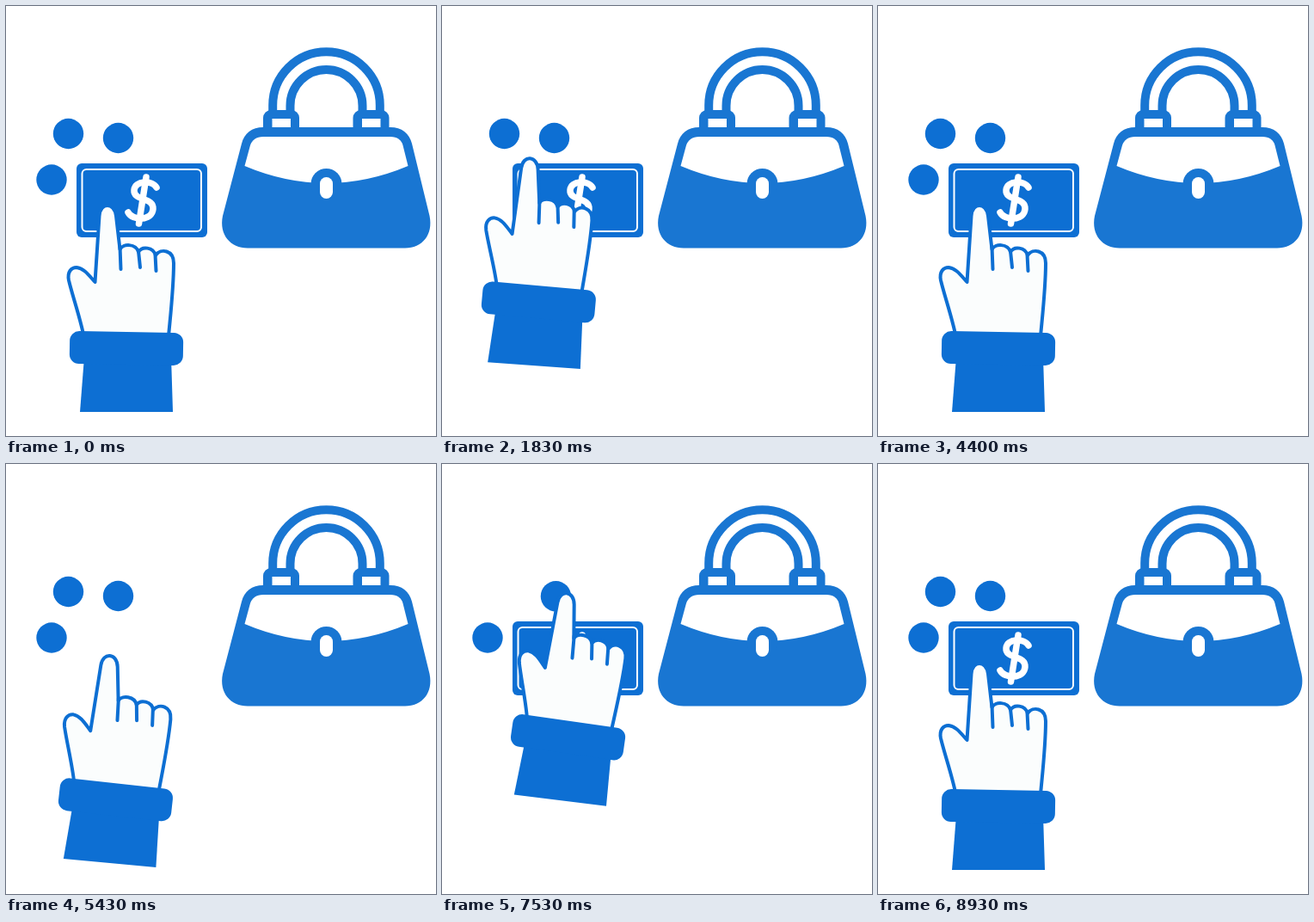
Animation of 500 by 500 pixels, one loop 9.01 s. Source, as an HTML page with a canvas:

```html
<!DOCTYPE html>
<html lang="en">
<head>
<meta charset="utf-8">
<title>Swipe to the bag</title>
<style>
  html, body { margin: 0; width: 100%; height: 100%; overflow: hidden; background: #fff; }
  canvas { display: block; width: 100vmin; height: 100vmin; }
</style>
</head>
<body>
<canvas id="stage" width="500" height="500"></canvas>
<script>
const ctx = document.getElementById('stage').getContext('2d');
const BLUE = '#0d6fd3', BAG = '#1976d2', SKIN = '#fbfdfd';
const LOOP = 9010, CYCLE = 4500;
const TIP = { x: 118, y: 230 };

// Hand poses: time, fingertip x, fingertip y, tilt in degrees
const POSES = [
  [20, 118, 230, 0],
  [430, 152, 234, 6.7],
  [677, 152, 234, 6.7],
  [1278, 70, 199.5, 3],
  [1625, 115, 199.5, 3.5],
  [2068, 87, 144.5, 5],
  [2430, 130, 151, 6],
  [3000, 144.5, 148.2, 7.1],
  [3301, 185, 152, 7.1],
  [4166, 118, 230, 0]
];

// Each item slides by dx, dy behind the bag, then fades back in at home
const DOTS = [
  { x: 53, y: 202, dx: 250, dy: 6, start: 1278 },
  { x: 72.5, y: 148.5, dx: 235, dy: 38, start: 2090 },
  { x: 130.5, y: 153.5, dx: 175, dy: 28, start: 3000 }
];
const BILL = { dx: 187, dy: 0, start: 190 };
const SLIDE = 450, AWAY = 1130, FADE = 150;

const clamp = v => Math.max(0, Math.min(1, v));
const ease = u => (1 - Math.cos(Math.PI * clamp(u))) / 2;

function handPose(t) {
  let i = POSES.findIndex(p => p[0] > t);
  if (i < 0) i = POSES.length;
  const a = POSES[Math.max(0, i - 1)], b = POSES[Math.min(i, POSES.length - 1)];
  const f = a === b ? 0 : ease((t - a[0]) / (b[0] - a[0]));
  return [1, 2, 3].map(k => a[k] + (b[k] - a[k]) * f);
}

function withItem(item, t, draw) {
  const age = t - item.start;
  const back = age >= AWAY;
  const f = back ? 0 : ease(age / SLIDE);
  if (f === 1) return;
  ctx.save();
  if (back) ctx.globalAlpha = clamp((age - AWAY) / FADE);
  ctx.translate(item.dx * f, item.dy * f);
  draw();
  ctx.restore();
}

function box(x, y, w, h, r) {
  ctx.beginPath();
  ctx.roundRect(x, y, w, h, r);
}

function fillPath(d, color) {
  ctx.fillStyle = color;
  ctx.fill(new Path2D(d));
}

function strokePath(d, color, width) {
  ctx.strokeStyle = color;
  ctx.lineWidth = width;
  ctx.lineCap = ctx.lineJoin = 'round';
  ctx.stroke(new Path2D(d));
}

function drawBill() {
  ctx.fillStyle = BLUE;
  box(82, 183, 152, 86, 6);
  ctx.fill();
  ctx.strokeStyle = '#fff';
  ctx.lineWidth = 2;
  box(88.5, 190, 138.5, 72, 5);
  ctx.stroke();
  strokePath('M175 211C170 202 150 203 149 214C148 227 172 222 171 236C170 250 147 250 142 240', '#fff', 7.5);
  strokePath('M163 199L154.5 253', '#fff', 7.5);
}

function drawDot(dot) {
  ctx.fillStyle = BLUE;
  ctx.beginPath();
  ctx.arc(dot.x, dot.y, 17.7, 0, 7);
  ctx.fill();
}

function drawHand([x, y, tilt]) {
  ctx.save();
  ctx.translate(x, y);
  ctx.rotate(tilt * Math.PI / 180);
  ctx.translate(-TIP.x, -TIP.y);

  const outline = 'M90 382C86 362 77 336 73 319C71 309 76 304 82 304' +
    'C91 305 97 314 103.5 321L108.5 244C109.5 228 126 228 128 244L132.5 283' +
    'C136 276 151 276 154 286C158 279 171 280 174 290' +
    'C180 281 195 284 195 299C195 326 192 352 189 384Z';
  fillPath(outline, SKIN);
  strokePath(outline, BLUE, 4);
  strokePath('M132.5 280L133.5 306M154 285L156 304M173.5 289L174.5 308', BLUE, 4);

  fillPath('M91 408L86 472H194L192 408Z', BLUE);
  ctx.translate(140, 398);
  ctx.rotate(0.017);
  ctx.fillStyle = BLUE;
  box(-66, -19, 132, 38, 11);
  ctx.fill();
  ctx.restore();
}

function drawArch(r, y) {
  ctx.strokeStyle = BAG;
  ctx.lineWidth = 10;
  ctx.lineCap = 'butt';
  ctx.beginPath();
  ctx.moveTo(372.5 - r, 126);
  ctx.arc(372.5, y, r, Math.PI, 0);
  ctx.lineTo(372.5 + r, 126);
  ctx.stroke();
}

function drawBag() {
  drawArch(62.3, 115.5);
  drawArch(42, 116);
  for (const x of [299, 403.5]) {
    ctx.fillStyle = BAG;
    box(x, 121, 42, 28, [9, 9, 0, 0]);
    ctx.fill();
    ctx.fillStyle = '#fff';
    ctx.fillRect(x + 10.5, 131, 21.5, 10);
  }
  fillPath('M299 141H447C460 141 469 148 472 160L492.5 244C497 266 484 281.5 464 281.5' +
    'H281C261 281.5 247.5 266 252 244L274 160C277 148 286 141 299 141Z', BAG);
  fillPath('M299 152H447C455 152 460 156 461.5 162L467.5 186Q372.5 226 277.5 186' +
    'L284 162C286 156 291 152 299 152Z', '#fff');
  ctx.fillStyle = BAG;
  ctx.beginPath();
  ctx.arc(372.5, 207, 18, 0, 7);
  ctx.fill();
  ctx.fillStyle = '#fff';
  box(365, 199, 15, 25, 7.5);
  ctx.fill();
}

function render(now) {
  const ms = now % LOOP % CYCLE;
  // the picture steps twice per 100 ms
  const t = Math.floor(ms / 100) * 100 + (ms % 100 >= 30 ? 30 : 0);
  ctx.fillStyle = '#fff';
  ctx.fillRect(0, 0, 500, 500);
  withItem(BILL, t, drawBill);
  for (const dot of DOTS) withItem(dot, t, () => drawDot(dot));
  drawBag();
  drawHand(handPose(t));
}

const begin = performance.now();
function tick() {
  render(performance.now() - begin);
  requestAnimationFrame(tick);
}
tick();
</script>
</body>
</html>
```
